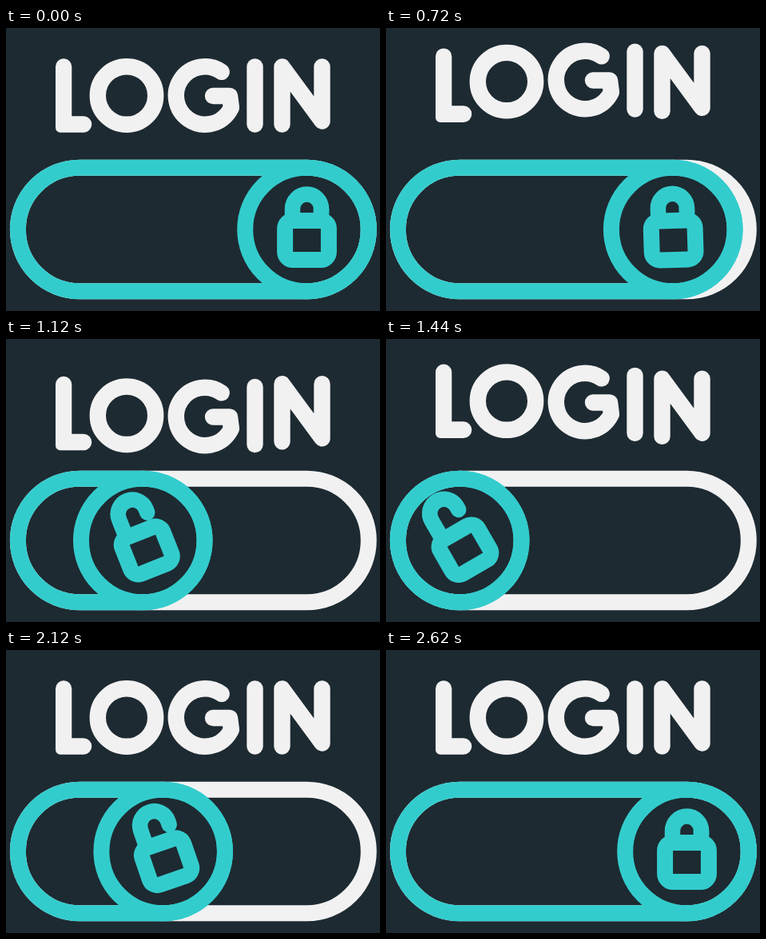
An HTML page with a canvas that plays this animation: 468x354 px, repeating every 2.82 s.

```html
<!DOCTYPE html>
<html lang="en">
<head>
<meta charset="utf-8">
<title>Login toggle</title>
<style>
  html, body { margin: 0; width: 100%; height: 100%; overflow: hidden; background: #1d2a31; }
  canvas { display: block; }
</style>
</head>
<body>
<canvas id="stage" width="468" height="354" role="img" aria-label="LOGIN"></canvas>
<script>
const ctx = document.getElementById('stage').getContext('2d');
const DARK = '#1d2a31', TEAL = '#33cccd', WHITE = '#f2f1f2';
const LOOP = 2820, STEP = 20;
const LEFT = 92.2, RIGHT = 376.5, MID = 252, R = 77.3;
const HOP = 400, LAG = 55, HEIGHTS = [0, -19.5, 12.5, -7, 0];

const clamp = v => Math.min(1, Math.max(0, v));
const ease = v => (1 - Math.cos(Math.PI * clamp(v))) / 2;
const mix = (a, b, k) => a + (b - a) * k;

// Damped hop: eased between successive heights
function hop(t) {
  const s = Math.min(HEIGHTS.length - 1.001, Math.max(0, t / HOP));
  const i = Math.floor(s);
  return mix(HEIGHTS[i], HEIGHTS[i + 1], ease(s - i));
}

function line(...pts) {
  ctx.beginPath();
  pts.forEach(([x, y]) => ctx.lineTo(x, y));
  ctx.stroke();
}

function ring(x, y, r) {
  ctx.beginPath();
  ctx.arc(x, y, r, 0, Math.PI * 2);
  ctx.stroke();
}

const letters = [
  function L() {
    ctx.beginPath();
    ctx.roundRect(62, 38.3, 20.3, 92.5, [10, 10, 0, 6]);
    ctx.roundRect(62, 110.2, 45.3, 20.6, [0, 10.3, 10.3, 6]);
    ctx.fill();
  },
  function O() { ring(151, 84.5, 36.2); },
  function G() {
    ctx.beginPath();
    ctx.arc(249, 84.5, 36.2, -0.96, 0.43, true);
    ctx.lineTo(280, 85);
    ctx.lineTo(259, 85);
    ctx.stroke();
  },
  function I() { line([311.5, 48.5], [311.5, 120.5]); },
  function N() { line([345.5, 120.5], [345.5, 48.5], [395.5, 116.5], [395.5, 48.5]); }
];

function drawWord(t) {
  ctx.strokeStyle = ctx.fillStyle = WHITE;
  ctx.lineWidth = 20.4;
  letters.forEach((draw, i) => {
    ctx.save();
    ctx.translate(0, hop(t - 200 - i * LAG));
    draw();
    ctx.restore();
  });
}

function pill(end, color) {
  ctx.strokeStyle = color;
  ctx.beginPath();
  ctx.roundRect(LEFT - R, MID - R, end - LEFT + 2 * R, 2 * R, R);
  ctx.stroke();
}

function drawLock(x, open) {
  ctx.save();
  ctx.translate(x, MID);
  ctx.rotate(-open * Math.PI / 6);
  const top = -26 - 13 * open;
  ctx.lineWidth = 19.5;
  ctx.beginPath();
  ctx.moveTo(-18, -11);
  ctx.lineTo(-18, top);
  ctx.arc(0, top, 18, Math.PI, 0);
  ctx.lineTo(18, top + 5);
  ctx.stroke();
  ctx.lineWidth = 20;
  ctx.beginPath();
  ctx.roundRect(-27.4, -11, 54.8, 49, 10);
  ctx.stroke();
  // Square shoulders for the shackle when it is shut
  if (open < 0.5) {
    ctx.lineWidth = 19.5;
    line([18, top], [18, -11]);
  }
  ctx.restore();
}

function drawToggle(t) {
  const open = ease((t - 590) / 820) - ease((t - 1780) / 820);
  const x = mix(RIGHT, LEFT, open);
  ctx.lineWidth = 20;
  pill(RIGHT, WHITE);
  pill(x, TEAL);
  ring(x, MID, R);
  drawLock(x, open);
}

function frame(now) {
  const t = Math.floor((now - start) % LOOP / STEP) * STEP;
  ctx.fillStyle = DARK;
  ctx.fillRect(0, 0, 468, 354);
  drawWord(t);
  drawToggle(t);
  requestAnimationFrame(frame);
}

ctx.lineCap = ctx.lineJoin = 'round';
const start = performance.now();
frame(start);
</script>
</body>
</html>
```
